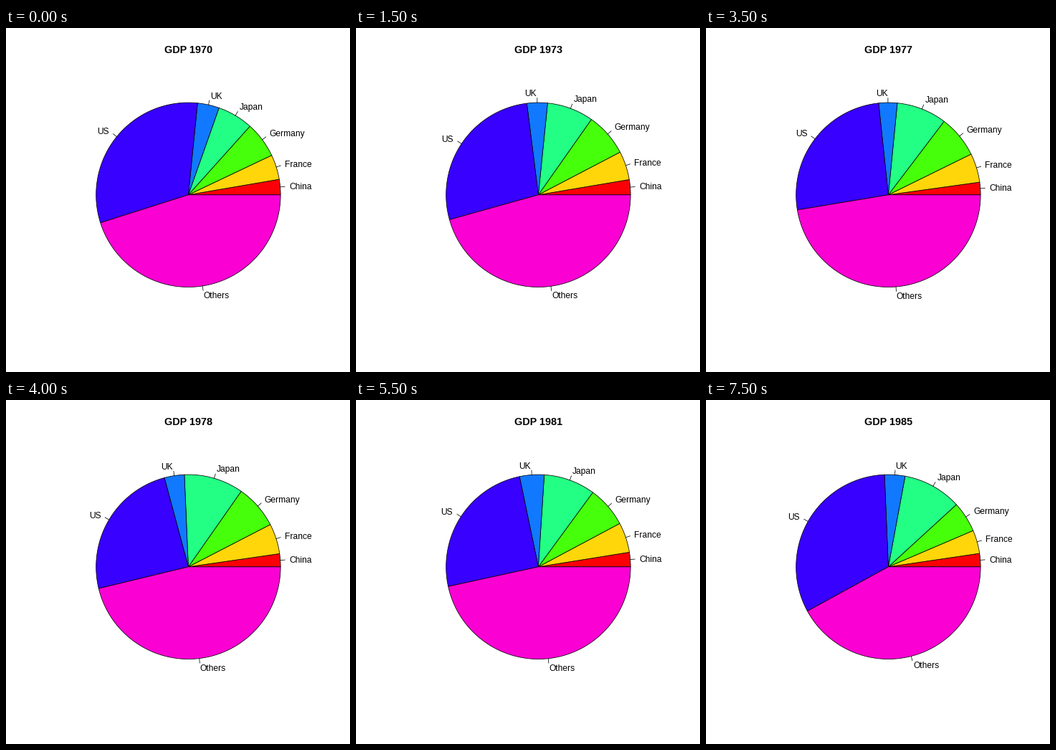
Recreate the animation shown at these times as a matplotlib script. Size 480 px wide and 480 px high, loop 8000 ms.

```python
import numpy as np
import matplotlib.pyplot as plt
from matplotlib.animation import FuncAnimation
from matplotlib.patches import Polygon
from matplotlib.textpath import TextPath

plt.rcParams["font.family"] = "Liberation Sans"
plt.rcParams["text.hinting"] = "force_autohint"

SIZE, DPI = 480, 100
PX = 72 / DPI  # points per pixel
LINE = 0.75 * PX
CX, CY, R = 254.4, 232.8, 128.7
YEARS = range(1970, 1986)

# Percent of world GDP at the turning points; straight lines in between
KEYS = [1970, 1973, 1975, 1977, 1978, 1980, 1983, 1985]
TRENDS = {
    "China": [2.7, 2.65, 2.45, 2.2, 2.28, 2.58, 2.45, 2.33],
    "France": [4.35, 5.01, 5.43, 5.07, 5.3, 5.69, 4.38, 4.1],
    "Germany": [6.3, 7.58, 7.37, 7.4, 7.7, 7.7, 6.05, 5.36],
    "Japan": [6.25, 8.15, 7.74, 8.77, 10.4, 8.8, 9.5, 10.29],
    "UK": [3.8, 3.6, 3.6, 3.24, 3.5, 4.55, 3.8, 3.58],
    "US": [31.5, 27.35, 25.53, 25.94, 24.6, 23.44, 28.55, 32.31],
}
NAMES = [*TRENDS, "Others"]
COLORS = ["#fc0007", "#ffd60a", "#46ff0a", "#23ff84",
          "#1179ff", "#3800ff", "#fb00d3"]


def polar(angle, scale=1.0):
    return CX + scale * R * np.cos(angle), CY - scale * R * np.sin(angle)


def slice_edges(year):
    shares = [np.interp(year, KEYS, trend) for trend in TRENDS.values()]
    return 2 * np.pi * np.array([0, *np.cumsum(shares) / 100, 1])


def ink_middle(text, size):
    """Height of the middle of the drawn letters above the baseline."""
    box = TextPath((0, 0), text, size=size).get_extents()
    return (box.y0 + box.y1) / 2


fig = plt.figure(figsize=(SIZE / DPI, SIZE / DPI), dpi=DPI, facecolor="white")
ax = fig.add_axes([0, 0, 1, 1])
ax.set_xlim(0, SIZE)
ax.set_ylim(SIZE, 0)
ax.axis("off")

title = ax.text(CX, 35, "", ha="center", va="baseline",
                fontsize=14.4 * PX, fontweight="bold")
slices, ticks, labels = [], [], []
for z, (name, color) in enumerate(zip(NAMES, COLORS), 1):
    wedge = Polygon([(CX, CY)] * 3, closed=True, facecolor=color,
                    edgecolor="black", linewidth=LINE, joinstyle="round",
                    snap=False, zorder=z)
    slices.append(ax.add_patch(wedge))
    ticks += ax.plot([], [], color="black", linewidth=LINE, snap=False, zorder=z)
    labels.append(ax.text(0, 0, name, va="baseline", fontsize=12 * PX, zorder=9))
rises = [ink_middle(name, 12) for name in NAMES]


def update(i):
    title.set_text(f"GDP {YEARS[i]}")
    edges = slice_edges(YEARS[i])
    for k, (a, b) in enumerate(zip(edges[:-1], edges[1:])):
        arc = np.column_stack(polar(np.linspace(a, b, 100)))
        slices[k].set_xy(np.vstack([arc, [CX, CY]]))
        mid = (a + b) / 2
        ticks[k].set_data(*polar(mid, np.array([1, 1.05])))
        x, y = polar(mid, 1.1)
        labels[k].set_position((x - 0.5, y + rises[k]))
        labels[k].set_ha("right" if x < CX else "left")
    return [title, *slices, *ticks, *labels]


anim = FuncAnimation(fig, update, frames=len(YEARS), interval=500,
                     repeat=True, repeat_delay=0)
plt.show()
```
